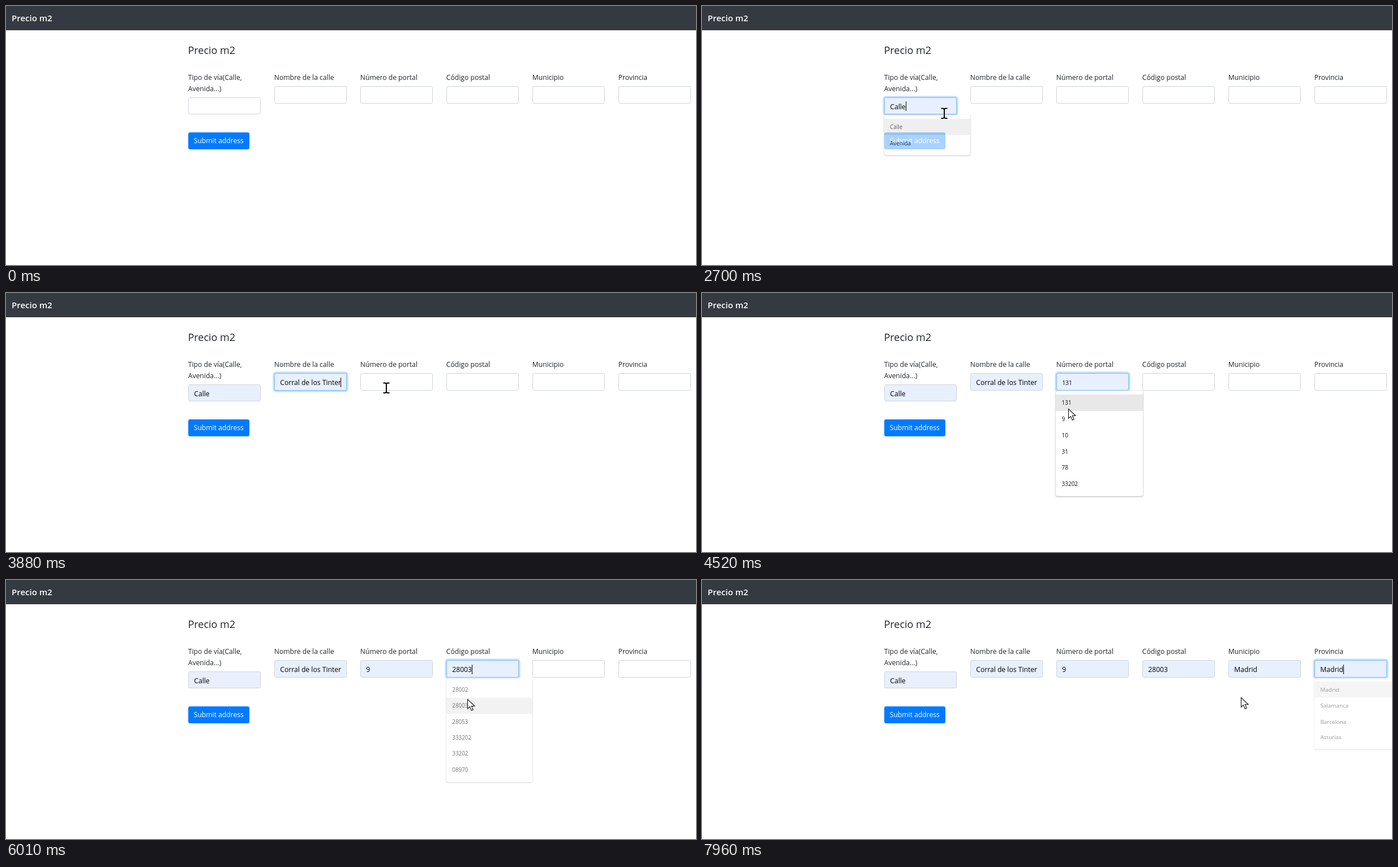
These frames come from a looping animation (1219x459 px, 8 s). An HTML page:

```html
<!DOCTYPE html>
<html lang="es">
<head>
<meta charset="utf-8">
<title>Precio m2</title>
<style>
  html, body { margin: 0; width: 100%; height: 100%; overflow: hidden; background: #fff; }
  #stage { position: relative; width: 1219px; height: 459px; overflow: hidden; background: #fff;
    font: 12.15px/19.2px "Open Sans", "Noto Sans", sans-serif; color: #212529; white-space: nowrap; cursor: default; }
  #stage div { position: absolute; box-sizing: border-box; }
  .nav { left: 0; top: 0; width: 1219px; height: 43px; background: #343a40; color: #fff;
    font-size: 15px; font-weight: 600; line-height: 43px; padding-left: 10px; }
  .title { left: 321.5px; top: 66px; font-size: 18px; line-height: 24px; }
  .button { left: 321.6px; top: 224px; width: 108.4px; height: 30.4px; border-radius: 3.2px;
    background: #007bff; color: #fff; text-align: center; line-height: 30.4px; }
  .label { top: 117.4px; white-space: pre; }
  .field { width: 128px; height: 30.4px; border: 1px solid #ced4da; border-radius: 3.2px; background: #fff; }
  .field.filled { background: #e8f0fe; }
  .ring { inset: -1px; border: 1px solid #80bdff; border-radius: 3.2px;
    box-shadow: 0 0 0 2.6px rgba(0, 123, 255, .25); }
  .value { left: 9.5px; top: 1px; width: 107.5px; height: 28.4px; line-height: 29.4px; overflow: hidden; color: #000; }
  .value.preview { font-size: 10.2px; line-height: 31px; }
  .caret { top: 6.5px; width: 1px; height: 17px; background: #000; }
  .menu { width: 154px; padding: 7px 0; background: #fff; border-radius: 3px; transform-origin: 50% 0;
    box-shadow: 0 0 1px rgba(0, 0, 0, .3), 0 1px 3px rgba(0, 0, 0, .28); }
  #stage .item { position: static; height: 28.75px; padding-left: 10.5px; font-size: 10px; font-weight: 500;
    line-height: 29.5px; color: #111; }
  #stage .item.on { background: #e8e8e9; }
  svg { position: absolute; left: 0; top: 0; overflow: visible; }
</style>
</head>
<body>
<div id="stage">
  <div class="nav">Precio m2</div>
  <div class="title">Precio m2</div>
  <div class="button">Submit address</div>
</div>
<script>
const LOOP = 8000, START = 1340, STEP = 67.5, ROW = 28.75, FIELD_H = 30.4;
const stage = document.getElementById('stage');
const clamp = v => Math.max(0, Math.min(1, v));

// focus: field is clicked, pick: a suggestion is chosen
const columns = [
  { label: 'Tipo de vía(Calle,\nAvenida...)', focus: 1990, pick: 2622, row: 0, items: ['Calle', 'Avenida'] },
  { label: 'Nombre de la calle', focus: 2990, pick: 3590, row: 1,
    items: ['de Valdorena', 'Corral de los Tinteros', 'Padre Zurela', 'del rio Ambelú', 'Julián Beco', 'del Arroyo de Urmelán'] },
  { label: 'Número de portal', focus: 3930, pick: 4740, row: 1, items: ['131', '9', '10', '31', '78', '33202'] },
  { label: 'Código postal', focus: 5190, pick: 5910, row: 1,
    items: ['28002', '28003', '28053', '333202', '33202', '08970'] },
  { label: 'Municipio', focus: 6620, pick: 6990, row: 0, items: ['Madrid', 'Salamanca', 'Barcelona', 'Gijon'] },
  { label: 'Provincia', focus: 7440, pick: 7839, row: 0, items: ['Madrid', 'Salamanca', 'Barcelona', 'Asturias'] }
];

// pointer hot spot: time, x, y
const path = [
  [1340, 727, 422], [1950, 408, 164], [2340, 408, 164], [2540, 416, 212], [2620, 420, 212], [2690, 428, 190],
  [2930, 540, 161], [3230, 540, 161], [3365, 524, 201], [3500, 530, 220], [3600, 532, 220],
  [3900, 690, 161], [4310, 690, 161], [4512, 647, 205], [4650, 652, 220], [4750, 656, 220],
  [5090, 842, 161], [5590, 842, 161], [5725, 815, 211], [6010, 815, 211],
  [6520, 1020, 161], [6800, 1020, 161], [6920, 1030, 188], [6995, 1034, 188], [7077, 1044, 173],
  [7380, 1124, 162], [7540, 1124, 162], [7605, 1120, 188], [7810, 1120, 188], [7955, 952, 208]
];

function add(parent, cls, text = '') {
  const el = document.createElement('div');
  el.className = cls;
  el.textContent = text;
  parent.appendChild(el);
  return el;
}

function place(el, x, y) {
  el.style.left = x + 'px';
  el.style.top = y + 'px';
}

columns.forEach((c, i) => {
  c.x = 321.8 + i * 152;
  c.y = i ? 142.4 : 161.6;
  c.menuY = c.y + FIELD_H + .6;
  add(stage, 'label', c.label).style.left = c.x + 'px';
  c.field = add(stage, 'field');
  place(c.field, c.x, c.y);
  c.ring = add(c.field, 'ring');
  c.value = add(c.field, 'value');
  c.caret = add(c.field, 'caret');
});
columns.forEach(c => {
  c.menu = add(stage, 'menu');
  place(c.menu, c.x - .8, c.menuY);
  c.rows = c.items.map(text => add(c.menu, 'item', text));
});

stage.insertAdjacentHTML('beforeend', `<svg width="1" height="1" id="pointer">
  <path id="arrow" d="M.5 .5V17.2L4.4 13.6L7.3 20.3L10.2 19L7.4 12.5H13Z" fill="#fff" stroke="#111" stroke-width="1.1"/>
  <g id="beam" fill="none"><path d="M-5.5 -8.5H5.5M0 -8.5V9M-5.5 9H5.5" stroke="#fff" stroke-width="3.4"/>
  <path d="M-5.5 -8.5H-1.5M1.5 -8.5H5.5M0 -8V8.5M-5.5 9H-1.5M1.5 9H5.5M-2 -8H2M-2 8.5H2" stroke="#000" stroke-width="2"/></g>
</svg>`);
const [pointer, arrow, beam] = ['pointer', 'arrow', 'beam'].map(id => document.getElementById(id));

const measure = document.createElement('canvas').getContext('2d');
measure.font = '12.15px "Open Sans", "Noto Sans", sans-serif';

function pointerAt(t) {
  const n = path.findIndex(p => p[0] > t);
  if (n < 0) return path[path.length - 1].slice(1);
  if (n === 0) return path[0].slice(1);
  const [t0, x0, y0] = path[n - 1], [t1, x1, y1] = path[n];
  const u = (t - t0) / (t1 - t0), k = u * u * (3 - 2 * u);
  return [x0 + (x1 - x0) * k, y0 + (y1 - y0) * k];
}

function drawColumn(c, i, t, px, py) {
  const next = i < 5 ? columns[i + 1].focus : Infinity;
  const picked = t >= c.pick, focused = t >= c.focus && t < next;
  const closing = clamp((t - c.pick) / 200);
  const opacity = clamp((t - c.focus - 30) / 90) * (1 - closing);

  let hover = -1;
  if (picked) hover = c.row;
  else if (opacity > 0 && px >= c.x && px < c.x + 154) hover = Math.floor((py - c.menuY - 7) / ROW);
  const text = c.items[hover] || '';

  c.menu.style.opacity = opacity;
  c.menu.style.visibility = opacity ? 'visible' : 'hidden';
  c.menu.style.transform = closing ? `scale(${1 - .025 * closing})` : 'none';
  c.rows.forEach((el, r) => el.classList.toggle('on', r === hover));

  c.field.classList.toggle('filled', text !== '');
  c.value.classList.toggle('preview', !picked);
  if (c.value.textContent !== text) c.value.textContent = text;
  c.ring.style.opacity = clamp((t - c.focus) / 150) - clamp((t - next) / 150);

  const since = t - (picked ? c.pick : c.focus);
  c.caret.style.visibility = focused && since % 1060 < 520 ? 'visible' : 'hidden';
  c.caret.style.left = 9.7 + (picked ? Math.min(106.5, measure.measureText(text).width) : 0) + 'px';
}

function draw(now) {
  const time = now % LOOP;
  // the screen refreshes in coarse steps
  const t = time < START ? 0 : START + Math.floor((time - START) / STEP) * STEP;
  const [px, py] = pointerAt(t);
  columns.forEach((c, i) => drawColumn(c, i, t, px, py));

  const overField = columns.some(c => px >= c.x && px <= c.x + 128 && py >= c.y && py < c.y + FIELD_H);
  pointer.style.display = time < START ? 'none' : 'block';
  pointer.style.transform = `translate(${Math.round(px)}px, ${Math.round(py)}px)`;
  arrow.style.display = overField ? 'none' : 'inline';
  beam.style.display = overField ? 'inline' : 'none';
}

function tick() {
  draw(performance.now());
  requestAnimationFrame(tick);
}
tick();
</script>
</body>
</html>
```
